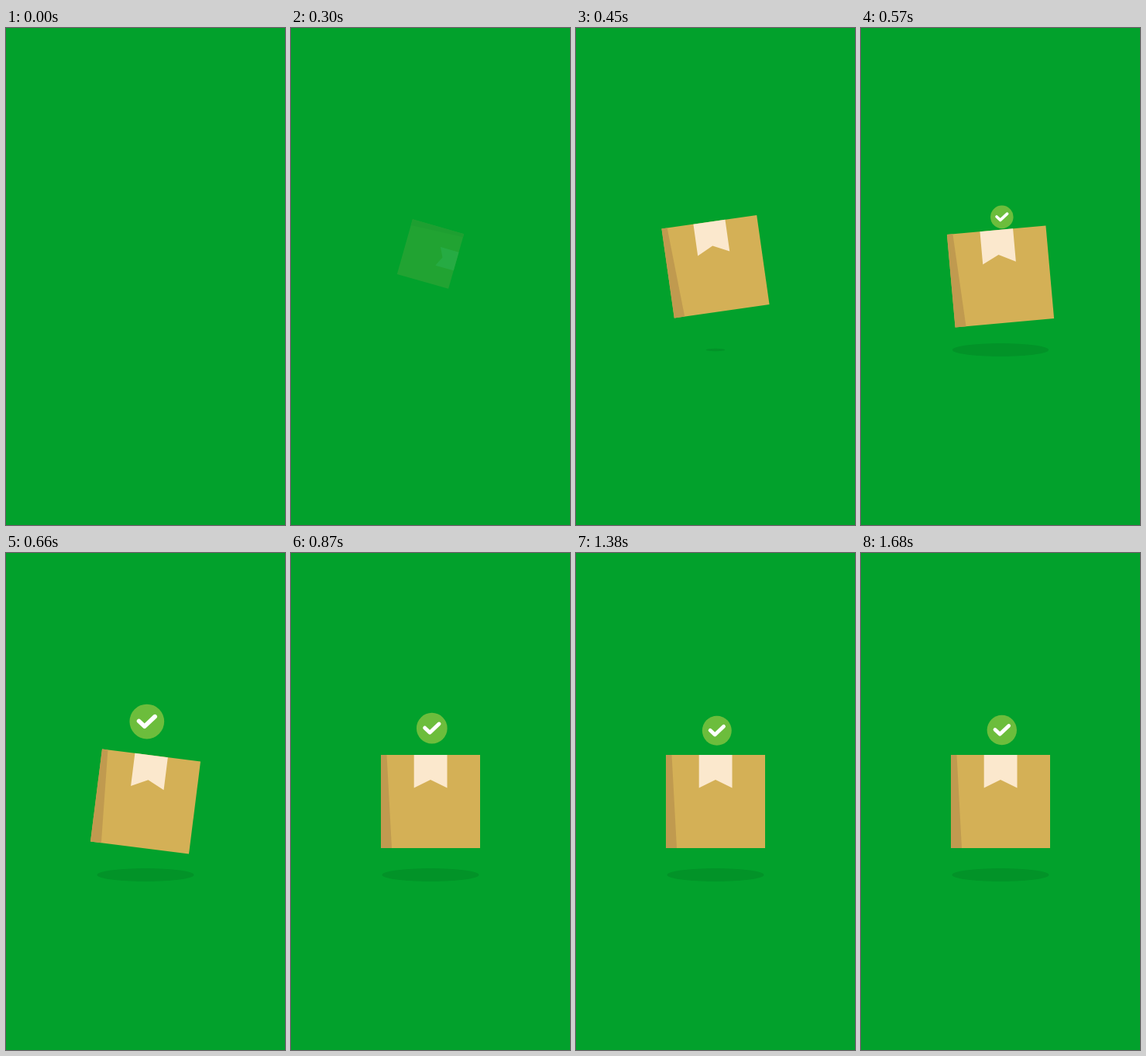
These frames come from a looping animation (360 px wide and 640 px high, 1.8 s). An HTML page:

```html
<!DOCTYPE html>
<html lang="en">
<head>
<meta charset="utf-8">
<title>Parcel confirmed</title>
<style>
  html, body { margin: 0; width: 100%; height: 100%; overflow: hidden; background: #02a12c; }
  svg { display: block; width: 100%; height: 100%; }
</style>
</head>
<body>
<svg viewBox="0 0 360 640">
  <ellipse id="shadow" rx="62.5" ry="8.5" fill="#029328"/>
  <g id="badge">
    <circle r="19.2" fill="#6cbd3c"/>
    <path d="M-8.8-.5-2.6 5.3 8.9-5.5" fill="none" stroke="#fff" stroke-width="4.8" stroke-linecap="round" stroke-linejoin="round"/>
  </g>
  <g id="box">
    <path d="M-64-60H64V60H-64Z" fill="#d4b056"/>
    <path d="M-64-60h7.5L-50 60h-14Z" fill="#c09a4f"/>
    <path d="M-21.3-60H21.5v42.5L0-28l-21.3 10.5Z" fill="#fbe8cd"/>
  </g>
</svg>
<script>
const LOOP = 1800;
const [shadow, badge, box] = ['shadow', 'badge', 'box'].map(id => document.getElementById(id));

const linear = p => p;
const easeIn = p => p * p;
const easeOut = p => p * (2 - p);
const smooth = p => p * p * (3 - 2 * p);

// Value at time t of a track: [time, value, easing towards this key]
function track(t, keys) {
  let [start, from] = keys[0];
  for (const [end, to, ease = smooth] of keys.slice(1)) {
    if (t < end) return from + (to - from) * ease(Math.max(0, (t - start) / (end - start)));
    [start, from] = [end, to];
  }
  return from;
}

function place(node, x, y, scale, angle = 0) {
  node.setAttribute('transform', `translate(${x} ${y}) rotate(${angle}) scale(${scale})`);
}

function draw(t) {
  const y = track(t, [[290, 291], [505, 320, easeIn]]);
  const scale = track(t, [[290, 0.57], [483, 1]]);
  const angle = track(t, [[290, 107], [483, -17.2], [660, 7.2], [850, 0]]);
  box.setAttribute('opacity', track(t, [[281, 0], [420, 1, linear]]));
  place(box, 180, y, scale, angle);

  place(shadow, 180, 414.5, track(t, [[400, 0], [580, 1]]));

  // The badge rises as it grows, overshoots and settles
  const pop = track(t, [[490, 0], [690, 1.19, easeOut], [970, 0.972], [1700, 1]]);
  place(badge, 181.8, 294.5 - 66.5 * pop, pop);
}

function tick() {
  draw(performance.now() % LOOP);
  requestAnimationFrame(tick);
}
tick();
</script>
</body>
</html>
```
